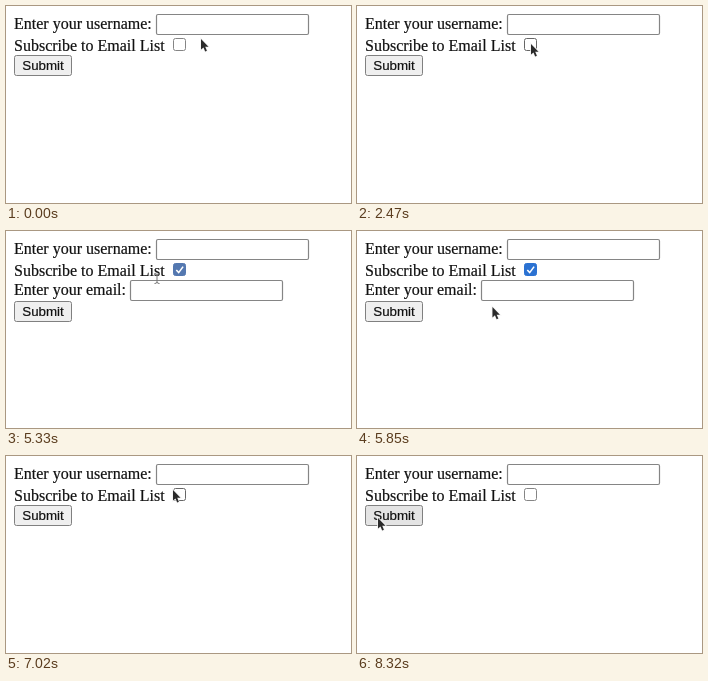
Recreate the animation shown at these times as an HTML page. Size 345 by 197 pixels, loop 8580 ms.

```html
<!DOCTYPE html>
<html lang="en">
<head>
<meta charset="utf-8">
<title>Subscribe form</title>
<style>
  html, body { margin: 0; width: 100%; height: 100%; overflow: hidden; background: #fff; }
  svg { display: block; width: 100vw; height: 100vh; }
  text { font: 16px "Liberation Serif", Times, serif; fill: #111; stroke: #111; stroke-width: .2px; }
  .label { font: 13.333px "Liberation Sans", Arial, sans-serif; text-anchor: middle; }
  .field { fill: #fff; stroke: #858585; stroke-width: 1.2px; }
</style>
</head>
<body>
<svg viewBox="0 0 345 197">
  <text x="8" y="23.3">Enter your username:</text>
  <rect class="field" x="150.5" y="8.5" width="152" height="20" rx="1.5"/>
  <text x="8" y="45">Subscribe to Email List</text>
  <rect id="box" x="167.5" y="32.5" width="12" height="12" rx="2"/>
  <path id="tick" d="M170.3 39l2.4 2.6 4.4-6" fill="none" stroke="#fff" stroke-width="1.6"/>
  <g id="email">
    <text x="8" y="64">Enter your email:</text>
    <rect class="field" x="124.5" y="49.5" width="152" height="20" rx="1.5"/>
  </g>
  <g id="submit">
    <rect id="face" x="8.5" y="49.5" width="57" height="20" rx="2" stroke="#808080"/>
    <text class="label" x="37" y="64">Submit</text>
  </g>
  <g id="cursor">
    <path id="arrow" d="M0 0V10.6L2.5 8.4 4.2 12.4 5.9 11.7 4.2 7.8H7.5Z"
      fill="#2a2a2a" stroke="#f4f4f4" stroke-width="1.6" paint-order="stroke"/>
    <path id="beam" d="M-2.5-4.5Q0-4.5 0-3Q0-4.5 2.5-4.5M0-3V4M-2.5 5.5Q0 5.5 0 4Q0 5.5 2.5 5.5"
      fill="none" stroke="#777"/>
  </g>
</svg>
<script>
const LOOP = 8580, STEP = 130;
const el = id => document.getElementById(id);
const show = (id, on) => el(id).setAttribute("visibility", on ? "visible" : "hidden");
const within = (t, from, to) => t >= from && t < to;

// each move ends at its point and rests there
const moves = [
  { from: 0, to: 520, x: 174, y: 38 },
  { from: 4680, to: 5330, x: 151, y: 47 },
  { from: 5330, to: 6110, x: 130, y: 86 },
  { from: 6110, to: 6370, x: 139, y: 45 },
  { from: 6370, to: 6890, x: 167, y: 34 },
  { from: 7150, to: 8060, x: 21, y: 62 }
];

function pointer(t) {
  let x = 195, y = 33;
  for (const m of moves) {
    const k = Math.min(1, Math.max(0, (t - m.from) / (m.to - m.from)));
    const ease = k * k * (3 - 2 * k);
    x += (m.x - x) * ease;
    y += (m.y - y) * ease;
  }
  return [x, y];
}

function draw(now) {
  const t = Math.floor(now % LOOP / STEP) * STEP;
  const checked = within(t, 910, 2470) || within(t, 4030, 6890);
  const hover = within(t, 520, 2860) || within(t, 4030, 5460) || within(t, 6760, 7280);
  const beam = within(t, 4810, 5460);
  const visible = !within(t, 2860, 4810);
  const blue = hover ? "#5478b0" : "#2b72d2";

  el("box").setAttribute("fill", checked ? blue : "#fff");
  el("box").setAttribute("stroke", checked ? blue : hover ? "#666" : "#858585");
  show("tick", checked);
  show("email", checked);
  el("submit").setAttribute("transform", `translate(0 ${checked ? 21 : 0})`);
  el("face").setAttribute("fill", t >= 8190 ? "#e4e4e4" : "#efefef");
  el("cursor").setAttribute("transform", `translate(${pointer(t)})`);
  show("arrow", visible && !beam);
  show("beam", visible && beam);
}

const start = performance.now();
function frame() {
  draw(performance.now() - start);
  requestAnimationFrame(frame);
}
frame();
</script>
</body>
</html>
```
